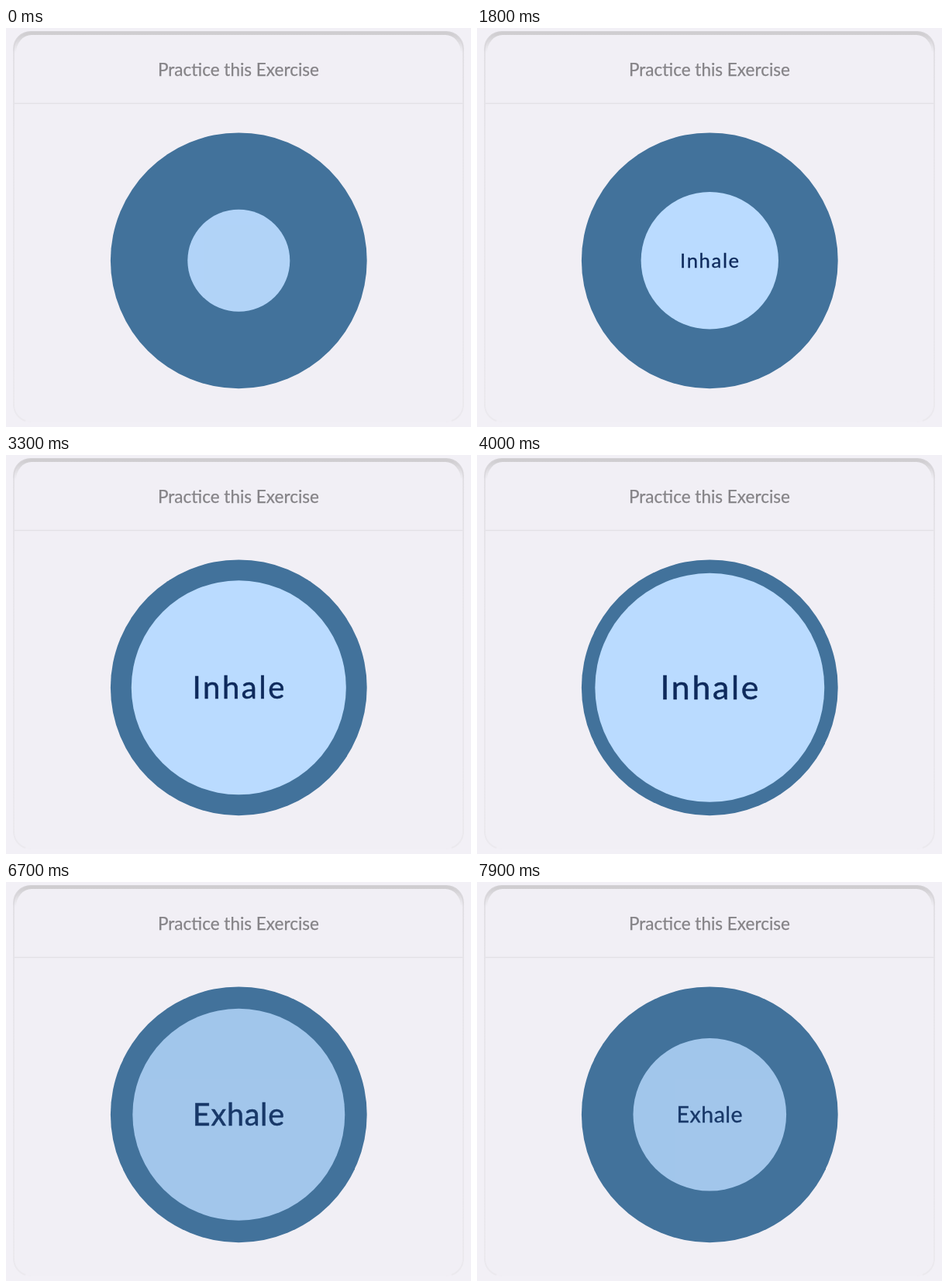
These frames come from a looping animation (600 by 516 pixels, 8000 ms). An HTML page:

```html
<!DOCTYPE html>
<html lang="en">
<head>
<meta charset="utf-8">
<title>Breathing exercise</title>
<style>
  html, body { margin: 0; width: 100%; height: 100%; overflow: hidden; background: #f2f0f6; }
  svg { display: block; width: 600px; height: 516px; }
  text { font-family: Lato, "Open Sans", sans-serif; text-anchor: middle; }
  .title { font-size: 22.5px; fill: #858387; stroke: #858387; stroke-width: .25px; }
  .word { font-size: 43px; fill: #0e2a5c; stroke: #0e2a5c; stroke-width: .5px; }
</style>
</head>
<body>
<svg viewBox="0 0 600 516">
  <defs>
    <linearGradient id="edge" x1="0" y1="0" x2="0" y2="1">
      <stop offset="0" stop-color="#d3d1d5"/>
      <stop offset=".05" stop-color="#e2e0e5"/>
      <stop offset=".3" stop-color="#e8e6eb"/>
      <stop offset="1" stop-color="#ebe9ee"/>
    </linearGradient>
    <linearGradient id="top" x1="0" y1="0" x2="0" y2="1">
      <stop offset="0" stop-color="#cfcdd0"/>
      <stop offset="1" stop-color="#cfcdd0" stop-opacity="0"/>
    </linearGradient>
    <filter id="soft"><feGaussianBlur stdDeviation=".7"/></filter>
  </defs>
  <rect x="10" y="5" width="580" height="505" rx="22" fill="#f1eff5"/>
  <g fill="none" filter="url(#soft)">
    <path d="M10 488V27A22 22 0 0 1 32 5H568A22 22 0 0 1 590 27V488A22 22 0 0 1 575 508M10 488A22 22 0 0 0 25 508" stroke="url(#edge)" stroke-width="2"/>
    <path d="M11 32A22 25 0 0 1 33 7H567A22 25 0 0 1 589 32" stroke="url(#top)" stroke-width="4"/>
  </g>
  <path d="M11 97.5H589" stroke="#e3e1e6" stroke-width="1.5"/>
  <text class="title" x="300" y="62">Practice this Exercise</text>
  <circle cx="300.3" cy="300.8" r="165.4" fill="#42729b"/>
  <g id="ball">
    <circle r="148.5" fill="#badbff"/>
    <text class="word" id="inhale" x="1" y="15.5" letter-spacing="2.7">Inhale</text>
    <text class="word" id="exhale" x="0" y="15.5" letter-spacing=".75">Exhale</text>
  </g>
</svg>
<script>
  const LOOP = 8000, STEP = 100, SMALL = 0.4 / 0.9;
  const $ = id => document.getElementById(id);
  const ball = $('ball'), inhale = $('inhale'), exhale = $('exhale');

  // Progress from 0 to 1 between two times
  const ramp = (t, from, to) => Math.min(1, Math.max(0, (t - from) / (to - from)));

  // cubic-bezier(.42, 0, .58, 1), solved by bisection
  function easeInOut(x) {
    let lo = 0, hi = 1;
    for (let i = 0; i < 24; i++) {
      const s = (lo + hi) / 2, u = 1 - s;
      if (1.26 * s * u * u + 1.74 * s * s * u + s * s * s < x) lo = s;
      else hi = s;
    }
    return lo * lo * (3 - 2 * lo);
  }

  function draw(t) {
    const size = easeInOut(ramp(t, 420, 4220)) - easeInOut(ramp(t, 5660, 9660));
    const scale = SMALL + (1 - SMALL) * size;
    ball.setAttribute('transform', `translate(300.3 300.8) scale(${scale})`);
    ball.setAttribute('opacity', 0.8 + 0.2 * (ramp(t, -200, 110) - ramp(t, 5200, 5500)));
    inhale.setAttribute('opacity', ramp(t, 400, 800) - ramp(t, 4600, 5000));
    exhale.setAttribute('opacity', ramp(t, 5700, 6100));
  }

  const start = performance.now();
  function frame() {
    const t = (performance.now() - start) % LOOP;
    draw(Math.floor(t / STEP) * STEP);
    requestAnimationFrame(frame);
  }
  frame();
</script>
</body>
</html>
```
